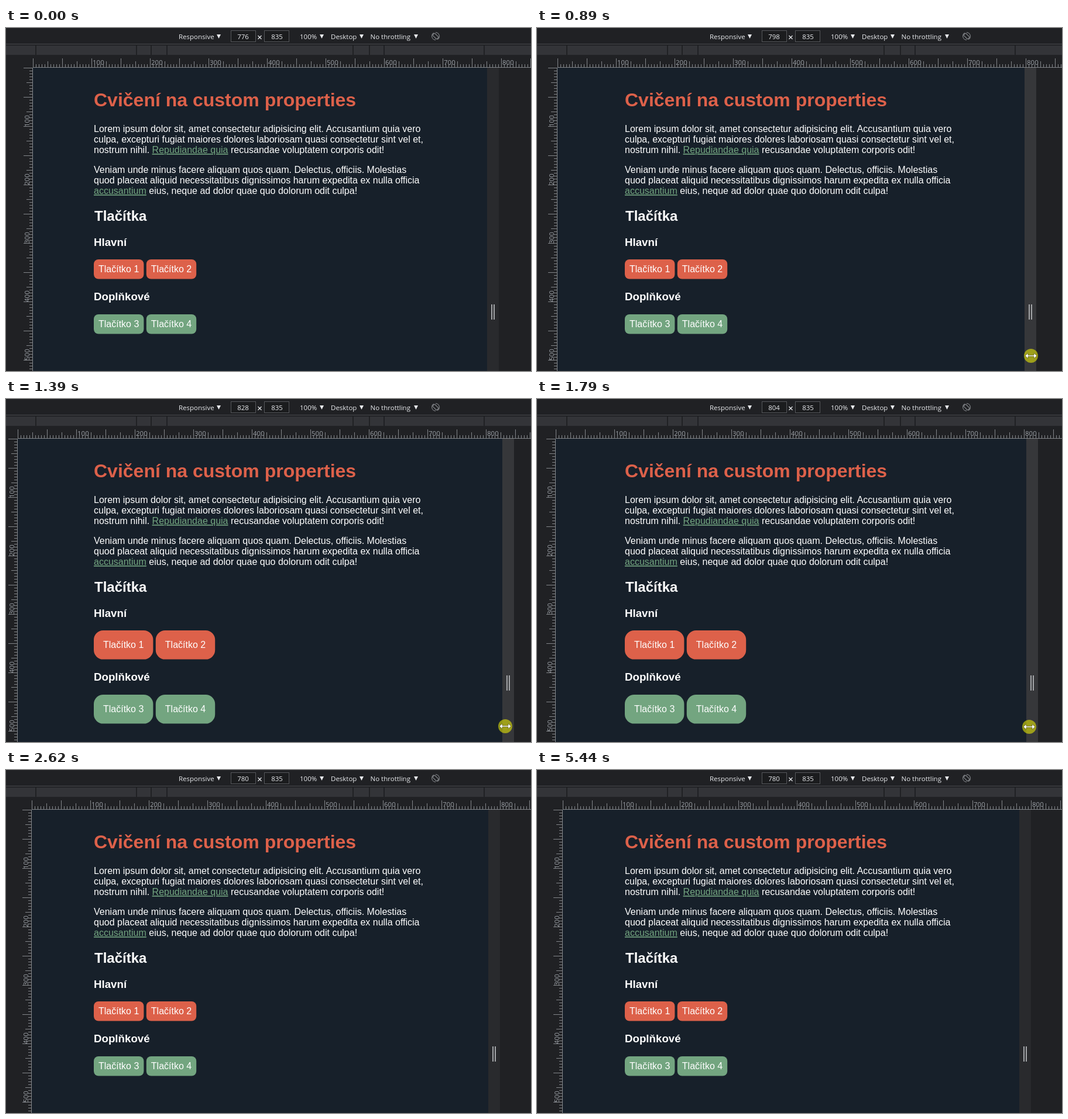
An HTML page that plays this animation: 897 by 587 pixels, repeating every 6490 ms.

```html
<!DOCTYPE html>
<html lang="cs">
<head>
<meta charset="utf-8">
<title>Custom properties</title>
<style>
  html, body { margin: 0; width: 100%; height: 100%; overflow: hidden; background: #202124; }
  svg { display: block; width: 897px; height: 587px; --bg: #17202a; --fg: #fff; }
  svg.light { --bg: #fff; --fg: #17202a; }
  text { white-space: pre; }
  .bar text { font: 11.5px "Open Sans", "Noto Sans", sans-serif; fill: #e8eaed; }
  .field { fill: #1b1c1e; stroke: #55575b; }
  .mid { text-anchor: middle; }
  .ruler path { stroke: #83868a; fill: none; }
  .ruler text { font: 11.5px "Open Sans", "Noto Sans", sans-serif; fill: #9a9fa5; }
  .page { font: 16px "Liberation Sans", Arial, sans-serif; fill: var(--fg); }
  .page h1, .h1 { font-size: 32px; font-weight: bold; fill: #dd614a; }
  .h2 { font-size: 24px; font-weight: bold; }
  .h3 { font-size: 18.72px; font-weight: bold; }
  .link { fill: #73a580; text-decoration: underline; }
  .main { fill: #dd614a; }
  .extra { fill: #73a580; }
  .label { fill: #fff; }
</style>
</head>
<body>
<svg id="stage" viewBox="0 0 897 587">
  <rect width="897" height="587" fill="#202124"/>

  <g class="bar">
    <text x="295" y="19">Responsive</text>
    <text x="502" y="19">100%</text>
    <text x="555" y="19">Desktop</text>
    <text x="622.5" y="19">No throttling</text>
    <path d="M360 11h7l-3.5 7zM536 11h7l-3.5 7zM604 11h7l-3.5 7zM697 11h7l-3.5 7z" fill="#e8eaed"/>
    <rect class="field" x="384.5" y="4.5" width="42" height="19"/>
    <rect class="field" x="441.5" y="4.5" width="42" height="19"/>
    <text id="size" class="mid" x="405" y="19"></text>
    <text class="mid" x="463" y="19">835</text>
    <path d="M430.5 13l6 6m0-6l-6 6" stroke="#e8eaed" stroke-width="1.2"/>
    <g transform="translate(734 14)" fill="none" stroke="#85888c" stroke-width="1.1">
      <rect x="-2.5" y="-5" width="5" height="10" rx=".8" transform="rotate(-45)"/>
      <path d="M-6.3 1A6.4 6.4 0 0 0 0 6.4M6.3-1A6.4 6.4 0 0 0 0-6.4M-6.3 1A6.4 6.4 0 0 1-3-5.6M6.3-1A6.4 6.4 0 0 1 3 5.6"/>
    </g>
    <path d="M0 27.5h897" stroke="#4a4c50"/>
    <rect y="30" width="897" height="16" fill="#333438"/>
    <path d="M51 29v17M223 29v17M248 29v17M275 29v17M593 29v17M621 29v17M646 29v17M817 29v17" stroke="#202124" stroke-width="2"/>
  </g>

  <g class="ruler">
    <g id="top"></g>
    <g id="side"></g>
  </g>

  <rect id="sheet" y="68" height="519" fill="var(--bg)"/>
  <g id="grip">
    <rect id="strip" y="68" width="20" height="519"/>
    <path d="M8 473v26M12 473v26" stroke="#a3a5a8" stroke-width="2"/>
  </g>

  <g class="page">
    <text class="h1" x="150" y="134">Cvičení na custom properties</text>
    <text x="150" y="178">Lorem ipsum dolor sit, amet consectetur adipisicing elit. Accusantium quia vero</text>
    <text x="150" y="196">culpa, excepturi fugiat maiores dolores laboriosam quasi consectetur sint vel et,</text>
    <text x="150" y="214">nostrum nihil. <tspan class="link">Repudiandae quia</tspan> recusandae voluptatem corporis odit!</text>
    <text x="150" y="248">Veniam unde minus facere aliquam quos quam. Delectus, officiis. Molestias</text>
    <text x="150" y="266">quod placeat aliquid necessitatibus dignissimos harum expedita ex nulla officia</text>
    <text x="150" y="284"><tspan class="link">accusantium</tspan> eius, neque ad dolor quae quo dolorum odit culpa!</text>
    <text class="h2" x="151" y="330">Tlačítka</text>
    <text class="h3" x="150" y="373">Hlavní</text>
    <text id="second" class="h3" x="150">Doplňkové</text>
    <g id="buttons"></g>
  </g>

  <g id="pointer">
    <circle r="12" fill="#ffff00" fill-opacity=".52"/>
    <path d="M-10 0l5-4.5v3.5h10v-3.5l5 4.5l-5 4.5v-3.5h-10v3.5z" fill="#fff" stroke="#4a4a14" stroke-width=".6"/>
  </g>
</svg>

<script>
const LOOP = 6490;
const $ = id => document.getElementById(id);

function add(parent, tag, attrs, text = '') {
  const el = document.createElementNS('http://www.w3.org/2000/svg', tag);
  for (const k in attrs) el.setAttribute(k, attrs[k]);
  el.textContent = text;
  parent.append(el);
  return el;
}

function buildRulers() {
  let top = 'M0 67.5H897', side = 'M-.5 68V587';
  for (let p = 0; p <= 900; p += 5) {
    const len = p % 50 === 0 ? 15 : p % 25 === 0 ? 10 : 5;
    top += `M${p + .5} 67v${-len}`;
    side += `M-1 ${p + 68.5}h${-len}`;
  }
  add($('top'), 'path', { d: top });
  add($('side'), 'path', { d: side });
  for (let p = 100; p <= 800; p += 100) {
    add($('top'), 'text', { x: p + 2, y: 63 }, p);
    add($('side'), 'text', { transform: `translate(-6 ${p + 69}) rotate(-90)` }, p);
  }
}

const buttons = [1, 2, 3, 4].map(n => ({
  col: (n - 1) % 2,
  row: n > 2 ? 1 : 0,
  box: add($('buttons'), 'rect', { class: n > 2 ? 'extra' : 'main' }),
  label: add($('buttons'), 'text', { class: 'label' }, `Tlačítko ${n}`)
}));

function layoutButtons(pad) {
  const width = 69.4 + 2 * pad, height = 17.6 + 2 * pad;
  for (const { col, row, box, label } of buttons) {
    const x = 150 + col * (width + 4.4);
    const y = 396 + row * (78 + 2 * pad);
    const shape = { x, y, width, height, rx: pad };
    for (const k in shape) box.setAttribute(k, shape[k]);
    label.setAttribute('x', x + pad);
    label.setAttribute('y', y + pad + 14);
  }
  $('second').setAttribute('y', 450 + 2 * pad);
}

// Bursts of movement: start, end, number of steps
const bursts = [[160, 370, 8], [630, 1150, 16], [1360, 1990, 21], [2020, 2090, 3], [2370, 2620, 7]];

const widthKeys = [[0, 776], [600, 776], [907, 798], [1150, 832], [1330, 832],
  [1391, 828], [1801, 804], [1990, 786], [2055, 782], [2090, 780]];

const pointerKeys = [[130, 838, 600], [370, 829, 570], [600, 829, 570], [907, 844, 561],
  [1150, 855, 560], [1330, 855, 560], [1391, 853, 560], [1801, 841, 561],
  [1990, 832, 566], [2090, 829, 571], [2328, 829, 571], [2620, 912, 564]];

function stepTime(t) {
  const burst = bursts.filter(b => b[0] <= t).pop();
  if (!burst) return 0;
  const [start, end, count] = burst;
  const step = (end - start) / (count - 1);
  return start + step * Math.min(count - 1, Math.round((t - start) / step + .1));
}

function sample(keys, t, i) {
  const next = keys.findIndex(k => k[0] > t);
  if (next === 0) return keys[0][i];
  if (next < 0) return keys[keys.length - 1][i];
  const a = keys[next - 1], b = keys[next];
  return a[i] + (b[i] - a[i]) * (t - a[0]) / (b[0] - a[0]);
}

function draw(t) {
  const at = stepTime(t);
  const width = 2 * Math.round(sample(widthKeys, at, 1) / 2);
  const left = 434 - width / 2;
  const dragging = t >= 630 && t < 2090;

  $('size').textContent = width;
  $('top').setAttribute('transform', `translate(${left})`);
  $('side').setAttribute('transform', `translate(${left})`);
  $('sheet').setAttribute('x', left);
  $('sheet').setAttribute('width', width);
  $('grip').setAttribute('transform', `translate(${left + width})`);
  $('strip').setAttribute('fill', dragging ? '#36373a' : '#292a2d');
  layoutButtons(width >= 800 ? 16 : 8);

  const x = Math.round(sample(pointerKeys, at, 1));
  const y = Math.round(sample(pointerKeys, at, 2));
  $('pointer').setAttribute('transform', `translate(${x} ${y})`);
  $('stage').classList.toggle('light', t >= 3350 && t < 5440);
}

buildRulers();
const begin = performance.now();
function tick() {
  draw((performance.now() - begin) % LOOP);
  requestAnimationFrame(tick);
}
tick();
</script>
</body>
</html>
```
